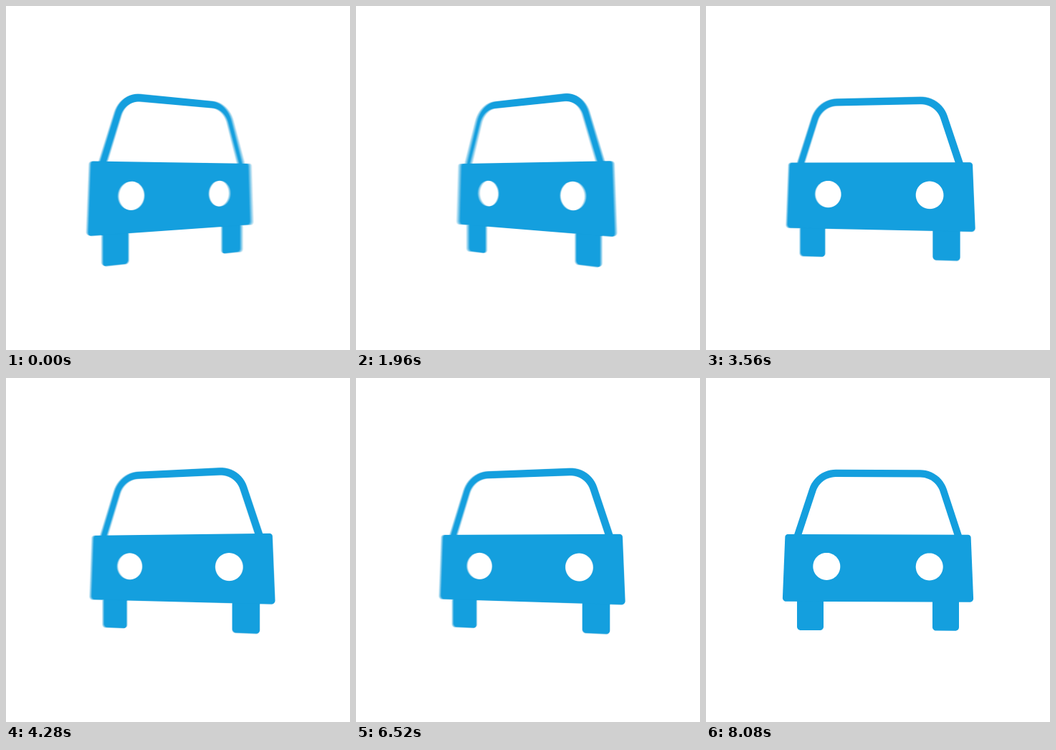
An HTML page with a canvas for the animation above (8120 ms loop, 480 by 480 pixels).

```html
<!DOCTYPE html>
<html lang="en">
<head>
<meta charset="utf-8">
<title>Spinning car</title>
<style>
  html, body { margin: 0; width: 100%; height: 100%; overflow: hidden; background: #fff; }
  canvas { display: block; }
</style>
</head>
<body>
<canvas id="stage" width="480" height="480"></canvas>
<script>
const SIZE = 480, MID = SIZE / 2;
const FRAME = 40, LOOP = 8120;
const LEAD = 3, SPIN_FRAMES = 205, SPIN = -11 * Math.PI; // 5.5 turns, entered 3 frames in
const CAMERA = SIZE * 25 / 18;
const TILT = 0.0035;
const SHUTTER = 0.5, SAMPLES = 16;
const BLUE = '#149fde', WHITE = '#fff';

const stage = document.getElementById('stage').getContext('2d');
const layer = document.createElement('canvas');
layer.width = layer.height = SIZE;
const pen = layer.getContext('2d');

// Outline of a polygon of [x, y, radius] corners with circular rounding
function rounded(corners) {
  const out = [];
  corners.forEach(([x, y, r], i) => {
    if (!r) return out.push([x, y]);
    const n = corners.length;
    const toward = ([px, py]) => {
      const len = Math.hypot(px - x, py - y);
      return [(px - x) / len, (py - y) / len];
    };
    const a = toward(corners[(i + n - 1) % n]), b = toward(corners[(i + 1) % n]);
    const half = Math.acos(a[0] * b[0] + a[1] * b[1]) / 2;
    const reach = r / Math.tan(half), w = Math.sin(half);
    for (let k = 0; k <= 12; k++) {
      const u = k / 12, p = (1 - u) ** 2, q = u * u, m = 2 * u * (1 - u) * w;
      const f = reach / (p + m + q);
      out.push([x + f * (p * a[0] + q * b[0]), y + f * (p * a[1] + q * b[1])]);
    }
  });
  return out;
}

const circle = (cx, cy, r) => Array.from({ length: 48 }, (_, i) => {
  const a = i * Math.PI / 24;
  return [cx + r * Math.cos(a), cy + r * Math.sin(a)];
});

// Symmetric four-cornered shape
const trapezoid = (top, topHalf, topR, bottom, bottomHalf, bottomR) => rounded([
  [-topHalf, top, topR], [topHalf, top, topR],
  [bottomHalf, bottom, bottomR], [-bottomHalf, bottom, bottomR]
]);

const wheel = side => rounded([
  [side * 76, 60, 0], [side * 113, 60, 0], [side * 113, 112.3, 5], [side * 76, 112.3, 5]
]);

const shapes = [
  [BLUE, trapezoid(-112, 87, 39, -18, 118, 0)],
  [WHITE, trapezoid(-101.7, 80, 29, -18, 107.5, 0)],
  [BLUE, wheel(-1)],
  [BLUE, wheel(1)],
  [BLUE, trapezoid(-21.6, 129.5, 4, 72.3, 133.3, 5)],
  [WHITE, circle(-71.7, 23.2, 19)],
  [WHITE, circle(71.7, 23.2, 19)]
];

function drawCar(angle) {
  const c = Math.cos(angle), s = Math.sin(angle);
  pen.fillStyle = WHITE;
  pen.fillRect(0, 0, SIZE, SIZE);
  for (const [color, points] of shapes) {
    pen.beginPath();
    for (const [x, y] of points) {
      const scale = CAMERA / (CAMERA - x * s);
      pen.lineTo(MID + x * c * scale, MID + (y - x * TILT) * scale);
    }
    pen.fillStyle = color;
    pen.fill();
  }
}

// Motion blur: running average over the open shutter
function render(frame) {
  for (let i = 0; i < SAMPLES; i++) {
    const at = frame + LEAD + SHUTTER * (i + 0.5) / SAMPLES;
    drawCar(SPIN * Math.min(at / SPIN_FRAMES, 1));
    stage.globalAlpha = 1 / (i + 1);
    stage.drawImage(layer, 0, 0);
  }
}

let shown = -1;
function tick() {
  const frame = Math.floor(performance.now() % LOOP / FRAME);
  if (frame !== shown) render(shown = frame);
  requestAnimationFrame(tick);
}
tick();
</script>
</body>
</html>
```
